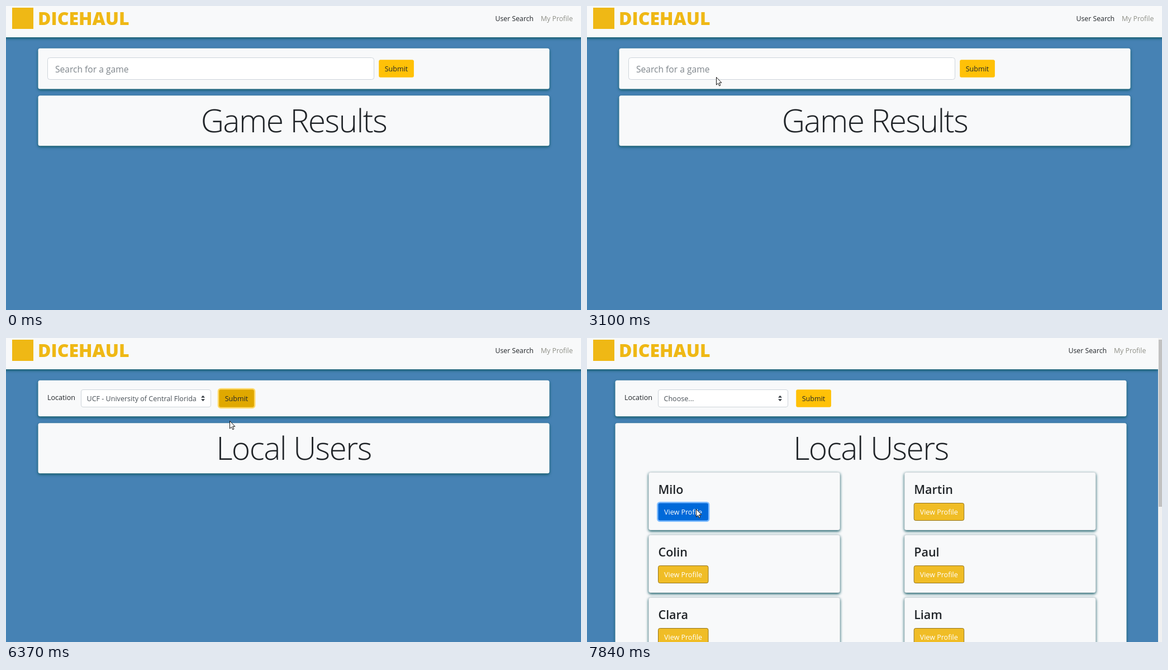
These frames come from a looping animation (1029x544 px, 8 s). An HTML page:

```html
<!DOCTYPE html>
<html lang="en">
<head>
<meta charset="utf-8">
<title>Game trading site</title>
<style>
  html, body { margin: 0; width: 100%; height: 100%; overflow: hidden; background: #4682b4; }
  svg { display: block; width: 100vw; height: 100vh; }
  text { font: 12.55px "Open Sans", "Noto Sans", sans-serif; fill: #212529; white-space: pre; }
  .panel { fill: #f8f9fa; filter: drop-shadow(0 2px 2.5px #0c5661); }
  .card { stroke: #d5dadd; }
  .field { fill: #fff; stroke: #ced4da; }
  .submit { fill: #ffc107; }
  .view { fill: #f0bd26; stroke: #94751c; }
  .title { font-size: 57px; font-weight: 300; letter-spacing: -1.6px; text-anchor: middle; }
  .name { font-size: 21.5px; font-weight: 600; }
  .search { font-size: 15.6px; fill: #7f868c; }
  .choice { fill: #495057; }
  .white { fill: #fff; }
  .link { font-size: 12.3px; }
  .muted { fill: #8f9088; }
  .brand { font-size: 32px; font-weight: 800; fill: #efb815; }
</style>
</head>
<body>
<svg id="stage" viewBox="0 0 1029 544" xmlns="http://www.w3.org/2000/svg"></svg>
<script>
const LOOP = 8000;
const OPEN = 4500, HOVER_OPTION = 5240, CHOSEN = 5480, SUBMIT = 6050;
const USERS_PAGE = 3630, LIST_PAGE = 6450, PROFILE_CLICK = 7760;

const rect = (x, y, w, h, cls, extra = "") =>
  `<rect x="${x}" y="${y}" width="${w}" height="${h}" class="${cls}" ${extra}/>`;
const label = (x, y, text, cls = "", extra = "") =>
  `<text x="${x}" y="${y}" class="${cls}" ${extra}>${text}</text>`;
const panel = (y, h) => rect(57.5, y, 915, h, "panel", 'rx="3.5"');
const title = (y, text) => label(515, y, text, "title");

const nav = (width, shift) =>
  rect(-10, -10, width + 10, 66, "panel") +
  rect(11, 3, 38, 38, "", 'fill="#efb815"') + label(57, 34, "DICEHAUL", "brand") +
  label(875.5 - shift, 27, "User Search", "link") + label(957 - shift, 27, "My Profile", "link muted");

const submit = (x, y, id = "") =>
  rect(x, y, 62.7, 31.5, "submit", `rx="3" id="${id}"`) + label(x + 10.5, y + 20.5, "Submit");

const locationForm = (id = "") =>
  panel(75.7, 64.5) + label(74, 111, "Location") +
  rect(134.5, 92.5, 232, 31, "field", `rx="3.5" id="${id}Select"`) +
  label(144.5, 113, "Choose...", "choice", `id="${id}Value"`) +
  '<path d="M349 106.8l3.5-4 3.5 4zM349 109.2h7l-3.5 4z" fill="#343a40"/>' +
  submit(381.2, 92.2, id + "Submit");

const options = ["Choose...", "UCF - University of Central Florida", "Full Sail", "Rollins College"];
const dropdown = '<g id="menu">' +
  rect(134.5, 123.5, 232, 74, "", 'fill="#fff" stroke="#6f9bdd"') +
  rect(135, 124, 231, 18.5, "", 'id="highlight" fill="#1e90ff"') +
  options.map((text, i) => label(145, 138 + 18 * i, text, "choice option")).join("") + "</g>";

const people = ["Milo", "Martin", "Colin", "Paul", "Clara", "Liam"];
const card = (name, i) =>
  `<g transform="translate(${110 + 457.7 * (i % 2)} ${240 + 112 * (i >> 1)})">` +
  rect(.5, .5, 342, 103, "panel card", 'rx="3"') + label(17.5, 39, name, "name") +
  rect(17.5, 55.5, 89.5, 31, "view", `rx="3" id="view${i}"`) +
  label(28, 76, "View Profile", "white") + "</g>";

const stage = document.getElementById("stage");
stage.innerHTML =
  `<g id="gamePage">${nav(1039, 0)}${panel(75.7, 72.7)}
    ${rect(74.5, 92.5, 584, 39, "field", 'rx="4"')}${label(88, 118.5, "Search for a game", "search")}
    ${submit(667.2, 96.3)}${panel(160.3, 90)}${title(226, "Game Results")}</g>
  <g id="usersPage">${nav(1039, 0)}${locationForm("user")}${panel(152.2, 90)}
    ${title(218, "Local Users")}${dropdown}</g>
  <g id="listPage">${nav(1022, 14)}
    <g transform="translate(-7)">${locationForm("list")}${panel(152.2, 420)}${title(218, "Local Users")}</g>
    ${people.map(card).join("")}
    ${rect(1022, 0, 7, 544, "", 'fill="#f1f1f1"')}${rect(1023, 3, 6, 299, "", 'fill="#c1c1c1"')}</g>
  <path id="arrow" d="M.5 .5v13.6l3.1-2.9 2.2 4.7 2.1-1-2.2-4.6h4.1z" fill="#fff" stroke="#111"/>
  <path id="beam" d="M-2.5-6h2l1 1 1-1h2M.5-5.5v12M-2.5 6.5h2l1-1 1 1h2" fill="none" stroke="#111"/>`;

const el = Object.fromEntries([...stage.querySelectorAll("[id]")].map(node => [node.id, node]));
const optionLabels = stage.querySelectorAll(".option");
const show = (node, on) => node.style.display = on ? "" : "none";

// Pointer stops: time, x, y
const stops = [
  [310, 998, 527], [700, 800, 265], [1080, 605, 78], [1400, 442, 131], [1950, 876, 47],
  [2030, 866, 35], [2490, 184, 20], [2720, 184, 20], [3480, 277, 233], [3780, 316, 237],
  [4340, 290, 112], [4810, 284, 116], [4970, 284, 116], [5210, 279, 141], [5480, 272, 150],
  [5750, 415, 110], [6050, 414, 111], [6370, 400, 148], [6450, 397, 163], [6600, 378, 183],
  [7000, 205, 306], [7300, 196, 383], [7460, 204, 373], [7680, 195, 308], [7840, 195, 306]
];
const TICK = 77;

// The pointer is sampled in ticks, so it moves in small jumps.
function pointerAt(t) {
  const next = stops.findIndex(s => s[0] > t);
  if (next < 0) return stops.at(-1).slice(1);
  if (next === 0) return stops[0].slice(1);
  const [t0, x0, y0] = stops[next - 1], [t1, x1, y1] = stops[next];
  const steps = Math.max(1, Math.round((t1 - t0) / TICK));
  const p = Math.floor((t - t0) / (t1 - t0) * steps) / steps;
  return [Math.round(x0 + (x1 - x0) * p), Math.round(y0 + (y1 - y0) * p)];
}

// A ring is a wide stroke painted behind the fill.
function paint(node, fill, stroke, ring) {
  node.style.fill = fill;
  node.style.stroke = stroke;
  node.style.strokeWidth = ring ? "5px" : "";
  node.style.paintOrder = ring ? "stroke" : "";
}

function draw(t) {
  const [x, y] = pointerAt(t);
  const over = (left, top, w, h) => x >= left && x <= left + w && y >= top && y <= top + h;

  show(el.gamePage, t < USERS_PAGE);
  show(el.usersPage, t >= USERS_PAGE && t < LIST_PAGE);
  show(el.listPage, t >= LIST_PAGE);

  show(el.menu, t >= OPEN && t < CHOSEN);
  const active = t < HOVER_OPTION ? 0 : 1;
  el.highlight.setAttribute("y", 124 + 18 * active);
  optionLabels.forEach((node, i) => node.classList.toggle("white", i === active));
  el.userValue.textContent = options[t < CHOSEN ? 0 : 1];
  el.userSelect.style.stroke = t >= OPEN && t < SUBMIT ? "#80bdff" : "";

  const pressed = t >= SUBMIT;
  if (pressed) paint(el.userSubmit, "#e0a800", "#ffda6a", true);
  else paint(el.userSubmit, over(381, 92, 63, 31) ? "#e0a800" : "", "");

  const clicked = t >= PROFILE_CLICK;
  if (clicked) paint(el.view0, "#0069d9", "#80bdff", true);
  else if (over(127, 295, 90, 31)) paint(el.view0, "#0069d9", "#0062cc");
  else paint(el.view0, "", "");

  const beam = t >= LIST_PAGE && t < 6680;
  show(el.beam, beam);
  show(el.arrow, t >= 310 && !beam);
  (beam ? el.beam : el.arrow).setAttribute("transform", `translate(${x} ${y})`);
}

function frame() {
  draw(performance.now() % LOOP);
  requestAnimationFrame(frame);
}
frame();
</script>
</body>
</html>
```
